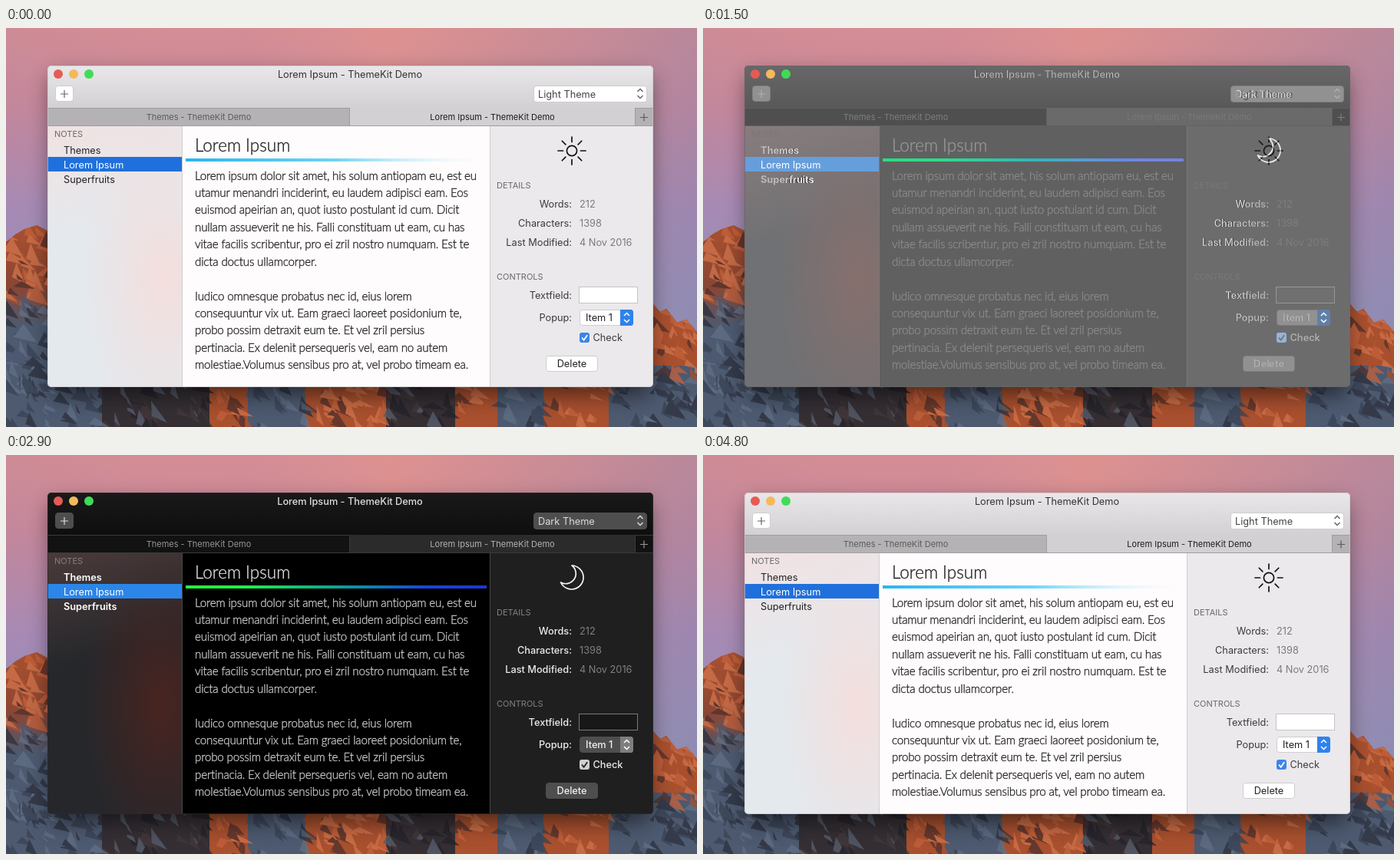
Recreate the animation shown at these times as an HTML page. Size 900 by 520 pixels, loop 4900 ms.

```html
<!DOCTYPE html>
<html lang="en">
<head>
<meta charset="utf-8">
<title>ThemeKit Demo</title>
<style>
  html, body { margin: 0; width: 100%; height: 100%; overflow: hidden; }
  svg { display: block; }
  text { font: 12.75px Inter, "Noto Sans", sans-serif; white-space: pre; }
  .small { font-size: 11px; }
  .bold { font-weight: 600; }
  .mid { font-weight: 500; }
  .body { font: 300 15.2px Lato, "Open Sans", sans-serif; letter-spacing: -.2px; }
  .head { font: 300 22.5px Lato, "Open Sans", sans-serif; }
</style>
</head>
<body>
<svg id="stage" width="900" height="520" viewBox="0 0 900 520"></svg>
<script>
const LOOP = 4900, STEP = 100, FADE = 250, TO_DARK = 1355, TO_LIGHT = 3765;

const LINES = `Lorem ipsum dolor sit amet, his solum antiopam eu, est eu
utamur menandri inciderint, eu laudem adipisci eam. Eos
euismod apeirian an, quot iusto postulant id cum. Dicit
nullam assueverit ne his. Falli constituam ut eam, cu has
vitae facilis scribentur, pro ei zril nostro numquam. Est te
dicta doctus ullamcorper.

Iudico omnesque probatus nec id, eius lorem
consequuntur vix ut. Eam graeci laoreet posidonium te,
probo possim detraxit eum te. Et vel zril persius
pertinacia. Ex delenit persequeris vel, eam no autem
molestiae.Volumus sensibus pro at, vel probo timeam ea.`.split('\n');

const light = {
  name: 'Light Theme', bar: ['#e9e7e9', '#d2d0d2'], tab: '#b4b2b4', active: '#d2d0d2', line: '#a09ea0',
  title: '#333', tabText: '#5c5b5c', activeText: '#1c1c1c', sep: '#d0ced0', edge: '#c9c7c9', weight: '',
  side: ['#f1e2e2', '#f3dedc', '#e4e9ee'], flat: '#ebe9ea', pick: '#1f70dc', flatPick: '#c6c6c8',
  item: '#222', itemClass: '', editor: '#fefcfc', head: '#222', body: '#1c1c1c',
  rule: [['0', '#2bb4ee', 1], ['.5', '#6fd3f7', 1], ['.97', '#d8f3fd', 0]],
  panel: '#ebe9eb', label: '#3c3c3c', value: '#7c7b7c', section: '#6b6a6b',
  button: '#fff', buttonEdge: '#cfcdcf', buttonText: '#222', sign: '#666', popText: '#444',
  field: '#fff', fieldEdge: '#c6c4c6', knob: '#2f82ec', arrow: '#fff', check: '#3a86ea', tick: '#fff',
  icon: `<circle cx="737" cy="160" r="6.6"/>` + [...Array(8)].map((_, i) =>
    `<path d="M748.5 160H755" transform="rotate(${i * 45} 737 160)"/>`).join(''), ink: '#111'
};
const dark = {
  name: 'Dark Theme', bar: ['#1a191a', '#0e0e0e'], tab: '#121212', active: '#2c2b2c', line: '#3b3a3b',
  title: '#dedede', tabText: '#969596', activeText: '#b4b3b4', sep: '#474647', edge: '#2c2b2c', weight: 'mid',
  side: ['#4b3a3a', '#482420', '#25272b'], flat: '#222122', pick: '#2b86ea', flatPick: '#cfcfd0',
  item: '#fff', itemClass: 'bold', editor: '#000', head: '#f2f2f2', body: '#d2d2d2',
  rule: [['0', '#24fb3c', 1], ['.2', '#1df04a', 1], ['.52', '#0a9f9a', 1], ['.8', '#1b45dc', 1], ['1', '#1c37d2', 1]],
  panel: '#201f20', label: '#ececec', value: '#807f80', section: '#828182',
  button: '#4f4e4f', buttonEdge: '#4f4e4f', buttonText: '#f0f0f0', sign: '#dcdcdc', popText: '#dcdcdc',
  field: '#191819', fieldEdge: '#7b7a7b', knob: '#7f7e7f', arrow: '#fff', check: '#d0cfd0', tick: '#222',
  icon: '<path d="M737 144A15.5 15.5 0 1 1 722.5 166A13.2 13.2 0 0 0 737 144Z"/>', ink: '#f4f4f4'
};

const rect = (x, y, w, h, fill, more = '') =>
  `<rect x="${x}" y="${y}" width="${w}" height="${h}" fill="${fill}" ${more}/>`;
const text = (x, y, s, fill, cls = '', anchor = 'start') =>
  `<text x="${x}" y="${y}" fill="${fill}" class="${cls}" text-anchor="${anchor}">${s}</text>`;
const path = (d, stroke, w = 1.2, fill = 'none') =>
  `<path d="${d}" stroke="${stroke}" stroke-width="${w}" fill="${fill}"/>`;
const plus = (x, y, c) => path(`M${x - 5} ${y}h10M${x} ${y - 5}v10`, c);
const arrows = (x, y, c) => path(`M${x - 3.5} ${y - 2.5}l3.5 -3.5l3.5 3.5M${x - 3.5} ${y + 2.5}l3.5 3.5l3.5 -3.5`, c, 1.5);
const stops = list => list.map(([o, c, a = 1]) => `<stop offset="${o}" stop-color="${c}" stop-opacity="${a}"/>`).join('');

// A snapshot has a flat sidebar instead of the translucent one.
function windowArt(t, id, snapshot) {
  const box = (x, y, w, h) => rect(x + .5, y + .5, w - 1, h - 1, t.button, `rx="3.5" stroke="${t.buttonEdge}"`);
  const label = (y, s) => text(737, y, s, t.label, t.weight, 'end');
  const value = (y, s) => text(747, y, s, t.value);
  const [s0, s1, s2] = t.side;
  return `<defs>
    <linearGradient id="bar${id}" x2="0" y2="1">${stops([[0, t.bar[0]], [1, t.bar[1]]])}</linearGradient>
    <linearGradient id="side${id}" x2=".15" y2="1">${stops([[0, s0], [.45, s2], [1, s2]])}</linearGradient>
    <radialGradient id="glow${id}" cx=".85" cy=".58" r=".6">${stops([[0, s1], [1, s1, 0]])}</radialGradient>
    <linearGradient id="rule${id}">${stops(t.rule)}</linearGradient>
  </defs>
  <g id="${id}"><g clip-path="url(#frame)">
    ${rect(54, 49, 789, 56, `url(#bar${id})`)}
    ${rect(54, 104, 789, 24, t.tab)}${rect(448, 104, 371, 24, t.active)}
    ${rect(54, 104, 394, 1, t.line)}${rect(819, 104, 24, 1, t.line)}${rect(54, 127, 789, 1, t.line)}
    ${rect(447, 104, 1, 24, t.line)}${rect(819, 104, 1, 24, t.line)}
    ${snapshot ? rect(54, 128, 175, 340, t.flat)
      : rect(54, 128, 175, 340, `url(#side${id})`) + rect(54, 128, 175, 340, `url(#glow${id})`)}
    ${rect(54, 168, 175, 19, snapshot ? t.flatPick : t.pick)}
    ${rect(230, 128, 400, 340, t.editor)}${rect(229, 128, 1, 340, t.sep)}
    ${rect(631, 128, 212, 340, t.panel)}${rect(630, 128, 1, 340, t.sep)}
    ${rect(234, 170, 392, 4, `url(#rule${id})`)}
    ${rect(54.5, 49.5, 788, 418, 'none', `rx="4.5" stroke="${t.edge}" stroke-opacity=".7"`)}
  </g>
  <circle cx="68" cy="60" r="6" fill="#e65b54"/><circle cx="88" cy="60" r="6" fill="#f4b95a"/><circle cx="108" cy="60" r="6" fill="#3fdc56"/>
  ${text(448, 65, 'Lorem Ipsum - ThemeKit Demo', t.title, t.weight, 'middle')}
  ${box(64, 75, 24, 21)}${plus(76, 86, t.sign)}
  ${box(687, 75, 148, 22)}${text(693, 91, t.name, t.popText)}${arrows(826, 85.5, t.sign)}
  ${text(251, 120, 'Themes - ThemeKit Demo', t.tabText, 'small', 'middle')}
  ${text(633.5, 120, 'Lorem Ipsum - ThemeKit Demo', t.activeText, 'small', 'middle')}
  ${plus(831, 116.5, t.tabText)}
  ${text(63, 142, 'NOTES', t.section, 'small')}
  ${text(75, 164, 'Themes', t.item, t.itemClass)}${text(75, 183, 'Lorem Ipsum', '#fff')}
  ${text(75, 202, 'Superfruits', t.item, t.itemClass)}
  <g stroke="${t.body}" stroke-width=".3">
    ${text(246, 161, 'Lorem Ipsum', t.head, 'head')}
    ${LINES.map((s, i) => text(246, 197.6 + i * 22.42, s, t.body, 'body')).join('')}
  </g>
  <g fill="none" stroke="${t.ink}" stroke-width="1.7" stroke-linecap="round" stroke-linejoin="round">${t.icon}</g>
  ${text(639, 209, 'DETAILS', t.section, 'small')}
  ${label(234, 'Words:')}${value(234, '212')}
  ${label(259, 'Characters:')}${value(259, '1398')}
  ${label(284, 'Last Modified:')}${value(284, '4 Nov 2016')}
  ${text(639, 328, 'CONTROLS', t.section, 'small')}
  ${label(353, 'Textfield:')}${rect(746.5, 337.5, 76, 21, t.field, `stroke="${t.fieldEdge}"`)}
  ${label(382, 'Popup:')}${box(747, 367, 70, 21)}
  <path d="M800 367h13.5a3.5 3.5 0 0 1 3.5 3.5v14a3.5 3.5 0 0 1 -3.5 3.5h-13.5z" fill="${t.knob}"/>
  ${arrows(808.5, 377.5, t.arrow)}${text(755, 382, 'Item 1', t.buttonText, t.weight)}
  ${rect(747, 397, 13, 13, t.check, 'rx="3"')}${path('M750 403.5l2.6 3.2l4.6 -6.5', t.tick, 1.8)}
  ${text(764.5, 408, 'Check', t.label, t.weight)}
  ${box(703, 427, 68, 21)}${text(737, 442, 'Delete', t.buttonText, t.weight, 'middle')}
  </g>`;
}

// Dusk sky over a rocky ridge made of seeded facets.
function wallpaper() {
  let seed = 11;
  const rnd = () => (seed = seed * 16807 % 2147483647) / 2147483647;
  const pick = list => list[Math.floor(rnd() * list.length)];
  const snow = ['#4d5a70', '#627086', '#3a4355', '#2c303c'];
  const rock = ['#352f34', '#453a3c', '#25232a', '#59606f'];
  const glow = ['#a9502f', '#c4623d', '#d2744c', '#50302d'];
  const zones = [[125, snow], [265, rock], [315, glow], [390, snow], [495, glow],
    [585, rock], [640, glow], [700, snow], [785, glow], [910, snow]];
  const palette = (x, y) => y < 345 || x > 838 && y < 445 ? glow : zones.find(z => x < z[0])[1];
  const facets = (n, x0, x1, y0, y1) => [...Array(n)].map(() => {
    const x = x0 + rnd() * (x1 - x0), y = y0 + rnd() * (y1 - y0), w = 7 + rnd() * 14, h = 9 + rnd() * 20;
    return `<path d="M${x} ${y}l${w} ${h}l${-w * (.8 + rnd())} ${-h * .3}z" fill="${pick(palette(x, y))}"/>`;
  }).join('');
  const ground = zones.map(([end, list], i) => {
    const start = i ? zones[i - 1][0] : 0;
    return rect(start, 440, end - start, 80, list[0]);
  }).join('');
  return `<defs>
    <linearGradient id="sky" x2="0" y2="1">${stops([[0, '#d58d94'], [.2, '#c7889c'], [.45, '#a68bb8'], [.7, '#9092bd']])}</linearGradient>
    <linearGradient id="haze">${stops([[0, '#a5809c', .15], [.35, '#e09a95', 0], [.55, '#f09a86', .35], [1, '#8f80a4', .4]])}</linearGradient>
    <linearGradient id="rock" x2="0" y2="1">${stops([[0, '#a9502f'], [.3, '#8a4634'], [.5, '#4d5a70'], [1, '#4d5a70']])}</linearGradient>
    <clipPath id="ridge"><path d="M0 279L12 269L24 262L40 257L54 264L300 300L600 340L843 360L852 370L860 366L874 384L886 380L900 396V520H0z"/></clipPath>
    <clipPath id="frame"><rect x="54" y="49" width="789" height="419" rx="5"/></clipPath>
    <filter id="blur" x="-20%" y="-20%" width="140%" height="150%"><feGaussianBlur stdDeviation="14"/></filter>
  </defs>
  ${rect(0, 0, 900, 520, 'url(#sky)')}${rect(0, 0, 900, 520, 'url(#haze)')}
  <g clip-path="url(#ridge)">${rect(0, 257, 900, 263, 'url(#rock)')}${rect(838, 355, 62, 90, glow[0])}${ground}
    <g opacity=".75">${facets(90, -5, 60, 255, 470)}${facets(55, 838, 905, 355, 470)}${facets(280, -10, 905, 445, 515)}</g></g>
  <rect x="58" y="62" width="781" height="417" rx="8" fill="#000" opacity=".5" filter="url(#blur)"/>`;
}

document.getElementById('stage').innerHTML = wallpaper() +
  windowArt(light, 'light') + windowArt(dark, 'dark') +
  windowArt(light, 'lightSnap', true) + windowArt(dark, 'darkSnap', true);

const layer = id => document.getElementById(id);
const [lightLive, darkLive, lightSnap, darkSnap] = ['light', 'dark', 'lightSnap', 'darkSnap'].map(layer);
const show = (el, a) => {
  el.style.display = a > 0 ? '' : 'none';
  el.style.opacity = a;
};
// Opacity of a snapshot that starts to fade away at the given time.
const fade = (t, start) => {
  const p = Math.min(1, (t - start) / FADE);
  return p < 0 ? 0 : 1 - p * p * (3 - 2 * p);
};

function draw(now) {
  const t = Math.floor((now % LOOP) / STEP) * STEP;
  const isDark = t >= TO_DARK && t < TO_LIGHT;
  show(lightLive, isDark ? 0 : 1);
  show(darkLive, isDark ? 1 : 0);
  show(lightSnap, fade(t, TO_DARK));
  show(darkSnap, fade(t, TO_LIGHT));
}

let begin;
function tick(now) {
  begin ??= now;
  draw(Math.max(0, now - begin));
  requestAnimationFrame(tick);
}
draw(0);
requestAnimationFrame(tick);
</script>
</body>
</html>
```
